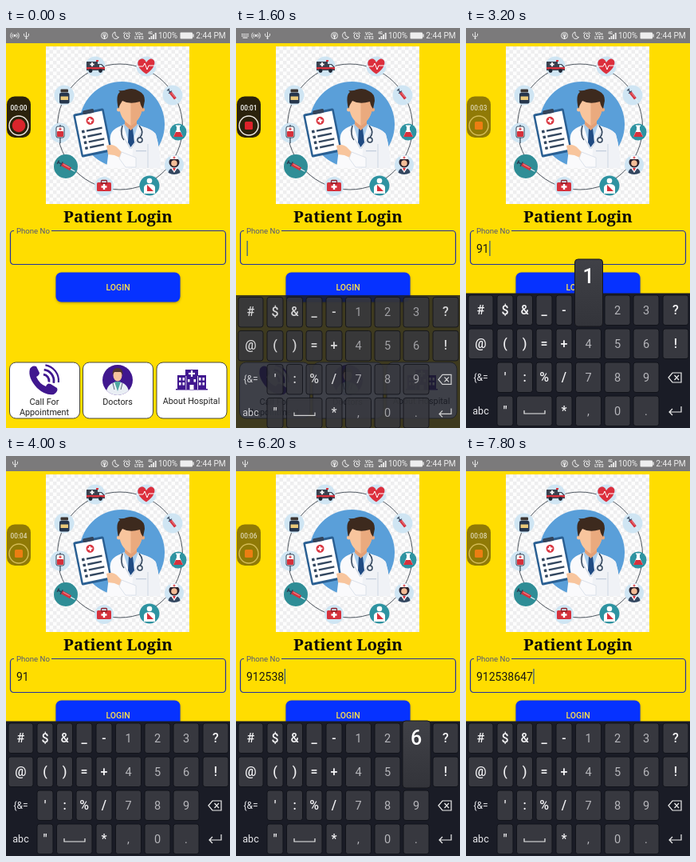
An HTML page with a canvas for the animation above (8 s loop, 281x500 px).

```html
<!DOCTYPE html>
<html lang="en">
<head>
<meta charset="utf-8">
<title>Patient Login</title>
<style>
html, body { margin: 0; width: 100%; height: 100%; overflow: hidden; background: #fd0; }
canvas { display: block; width: 281px; height: 500px; }
</style>
</head>
<body>
<canvas id="stage"></canvas>
<script>
const LOOP = 8000, TAU = Math.PI * 2;
const canvas = document.getElementById('stage');
const dpr = window.devicePixelRatio || 1;
canvas.width = 281 * dpr;
canvas.height = 500 * dpr;
const c = canvas.getContext('2d');

// Each key press: key, time down, time the digit lands, time up
const PRESSES = [
  ['9', 2400, 2500, 2800], ['1', 3000, 3100, 3400], ['2', 5150, 5300, 5400],
  ['5', 5400, 5500, 5600], ['3', 5600, 5700, 5800], ['8', 5850, 5950, 6050],
  ['6', 6150, 6300, 6400], ['4', 6400, 6500, 6600], ['7', 6700, 6800, 7000]
];
const TICKS = [800, 1800, 2800, 3800, 4600, 5600, 6600, 7400];

const clamp = v => Math.max(0, Math.min(1, v));

function dot(x, y, r, fill) {
  c.beginPath(); c.arc(x, y, r, 0, TAU);
  c.fillStyle = fill; c.fill();
}
function ring(x, y, r, stroke, w = 1, a = 0, b = TAU) {
  c.beginPath(); c.arc(x, y, r, a, b);
  c.strokeStyle = stroke; c.lineWidth = w; c.stroke();
}
function oval(x, y, rx, ry, fill) {
  c.beginPath(); c.ellipse(x, y, rx, ry, 0, 0, TAU);
  c.fillStyle = fill; c.fill();
}
function box(x, y, w, h, r, fill, stroke, lw = 1) {
  c.beginPath(); c.roundRect(x, y, w, h, r);
  if (fill) { c.fillStyle = fill; c.fill(); }
  if (stroke) { c.strokeStyle = stroke; c.lineWidth = lw; c.stroke(); }
}
function shape(d, fill, stroke, w = 1) {
  const p = new Path2D(d);
  if (fill) { c.fillStyle = fill; c.fill(p); }
  if (stroke) { c.strokeStyle = stroke; c.lineWidth = w; c.stroke(p); }
}
function text(s, x, y, size, fill, align = 'center', weight = 400, family = 'Roboto, "Liberation Sans", sans-serif') {
  c.font = `${weight} ${size}px ${family}`;
  c.textAlign = align;
  c.fillStyle = fill;
  c.fillText(s, x, y);
}
function at(x, y, angle, draw) {
  c.save(); c.translate(x, y); c.rotate(angle); draw(); c.restore();
}
function cross(x, y, r, fill, w = r * 0.7) {
  c.fillStyle = fill;
  c.fillRect(x - r, y - w / 2, r * 2, w);
  c.fillRect(x - w / 2, y - r, w, r * 2);
}

// Status bar
function usb(x) {
  shape(`M${x} 5V13M${x - 3} 7V9Q${x - 3} 11 ${x} 11Q${x + 3} 11 ${x + 3} 9V7`, null, '#eee', 0.9);
  dot(x, 13, 1, '#eee');
}
function signal(x) {
  dot(x, 9.5, 1.4, '#eee');
  for (const r of [3, 5.2]) {
    ring(x, 9.5, r, '#eee', 1, -0.8, 0.8);
    ring(x, 9.5, r, '#eee', 1, Math.PI - 0.8, Math.PI + 0.8);
  }
}
function statusBar(t) {
  c.fillStyle = '#7b7a7b';
  c.fillRect(0, 0, 281, 19);
  if (t < 1400) { signal(11); usb(25.5); }
  else if (t < 2200) {
    for (let i = 0; i < 4; i++) {
      c.fillStyle = '#eee';
      c.fillRect(7 + i * 2.4, 7, 1.5, 1.4);
      c.fillRect(7 + i * 2.4, 9.3, 1.5, 1.4);
    }
    c.fillRect(8.5, 11.6, 6, 1.2);
    signal(25); usb(39.5);
  } else usb(11.5);
  const w = '#eee';
  ring(123.5, 9.5, 4, w);
  ring(123.5, 9, 1.7, w);
  c.fillStyle = w;
  c.fillRect(122.8, 9, 1.5, 5);
  shape('M137 5A4.3 4.3 0 1 0 141.5 11.5Q136 11 137 5Z', null, w);
  ring(151.5, 10, 3.5, w);
  shape('M151.5 8V10.5H153.5M147 7L149.5 5M156 7L153.5 5', null, w);
  text('VO+', 167, 9, 5.2, w, 'center', 700);
  text('LTE2', 167, 14, 5.2, w, 'center', 700);
  text('4G', 181, 8, 4.5, w, 'center', 700);
  for (let i = 0; i < 4; i++) c.fillRect(179 + i * 2.6, 12 - i * 2, 1.8, 2 + i * 2);
  text('100%', 203, 13.2, 10, w);
  box(218.5, 5.5, 15.5, 8, 1, w);
  c.fillRect(234.3, 7.5, 1.4, 4);
  text('2:44 PM', 257, 13.2, 10.2, w);
}

// Illustration
function syringe(x, y, s, angle) {
  at(x, y, angle, () => {
    c.scale(s, s);
    shape('M-11 0H-5M-11 -2.5V2.5M-6 -3.2V3.2', null, '#2d3f57', 1.5);
    shape('M7 0H13', null, '#e4edf1', 1.2);
    box(-5.5, -2.2, 12.5, 4.4, 0.5, '#d6323e');
    shape('M-4 -0.8H5', null, '#f0a0a4', 0.9);
  });
}
function badges() {
  const pale = '#cfe5f3', red = '#d6313c', navy = '#24364f', teal = '#2e93a1';
  [[112, 48], [176, 48], [209, 84], [211, 171], [123, 198], [68, 131], [73, 84]]
    .forEach(([x, y], i) => dot(x, y, i === 4 || i === 3 ? 12 : 12.5, pale));
  dot(216, 130, 10.5, teal);
  dot(180, 197, 12.5, teal);
  dot(75, 173, 15, '#2f8d96');

  shape('M101 42H115V53H101ZM115 45H120L124 49V53H115Z', '#3a414e');
  c.fillStyle = red;
  c.fillRect(101, 49, 23, 2.5);
  c.fillRect(113, 40, 3, 2);
  cross(108, 45.5, 2.6, '#fff');
  shape('M117 46H119.5L122 49H117Z', '#cfe5f3');
  dot(106, 53.5, 2.4, '#1d2836'); dot(118.5, 53.5, 2.4, '#1d2836');

  shape('M176 57.5C160 47 165 37.5 172 38.5Q175 39.5 176 43Q178 39.5 181 38.5C188 38 190 48 176 57.5Z', '#dc2f3d');
  shape('M164 48H172L174 44L177 52L179 47H188', null, '#fff', 1);

  syringe(209, 84, 0.8, 0.9);
  syringe(75, 173, 1, 0.5);

  shape('M214 122H218V127L222 136H210L214 127Z', '#fff');
  shape('M213 130H219L222 136H210Z', red);
  c.fillStyle = '#fff'; c.fillRect(213, 121.5, 6, 1.5);

  oval(211, 168, 6.5, 6.5, '#2b2029');
  dot(211, 169, 3.8, '#f4bd98');
  shape('M206 164L207 160H215L216 164Z', '#fff');
  cross(211, 162, 1.5, red);
  shape('M203.5 181Q204 175 211 175Q218 175 218.5 181Q211 185 203.5 181Z', '#34465f');
  shape('M207 175H215L211 181Z', '#fff');
  shape('M209 175H213L211 179Z', red);

  box(114, 193, 18, 11, 1.5, red);
  box(119.5, 190.5, 7, 4, 1, null, '#8f222b', 1.3);
  cross(123, 198.5, 3.5, '#fff');

  dot(180, 191, 3.3, '#fff');
  shape('M173 207V199Q174 195 180 195Q186 195 187 199V207Z', '#fff');
  shape('M177 196L185 204H177Z', red);

  box(67, 81, 12.5, 13.5, 2, '#26364c');
  box(68.5, 76.5, 9.5, 4, 1, '#3c3532');
  c.fillStyle = '#e9c878'; c.fillRect(68.5, 85.5, 9.5, 4.5);

  box(63, 123, 10, 14, 2, '#fff', '#2c4156', 1);
  box(64, 129, 8, 7, 1, red);
  shape('M68 121V123M68 137V144', null, '#2c4156', 1.2);
  cross(68, 126.3, 1.7, red);
}
function doctor() {
  dot(145.5, 120.5, 53.5, '#5a9fd9');
  c.save();
  c.beginPath(); c.rect(80, 60, 130, 115); c.clip();
  shape('M126 176L131 135Q132 126 148 121H164Q184 126 188 133Q193 150 194 176Z', '#fafafc');
  shape('M162 122H164Q184 126 188 133Q193 150 194 176H157Z', '#f0f2f6');
  shape('M147 120L156 150L166 120Z', '#a9cdec');
  shape('M154 126H159L161 143L156.5 149L153 143Z', '#1f4a82');
  shape('M149 112H164V121L156.5 128L149 121Z', '#e3a077');
  c.restore();
  shape('M142 94Q142 82 156 82Q171 82 171 94Q172 113 156.5 122Q141 113 142 94Z', '#f8c59d');
  shape('M156.5 82Q171 82 171 94Q172 113 156.5 122Z', '#eaaa7e');
  dot(141.5, 102, 2.5, '#f8c59d'); dot(171.5, 102, 2.5, '#eaaa7e');
  shape('M141 101Q137 84 143 80L141 78Q147 79 151 77Q160 74 167 79Q174 82 174 91L172 101Q169 98 168 92Q155 96 146 91Q143 95 141 101Z', '#3d2a1e');
  shape('M147 121L143 128L156 151M166 121L171 128L157 151', null, '#c3cedd', 1);
  shape('M146 122Q143 135 148 140M167 122Q174 130 168 137', null, '#31445b', 1.5);
  ring(168, 140, 3, '#31445b', 1.5);
  shape('M178 145V175', null, '#ccd5e2', 1);
  box(163, 153, 13, 1.3, 0, '#c3cedd');

  at(108.5, 130.5, -0.2, () => {
    box(-19.5, -27, 39, 55, 2, '#2a5f92');
    box(-17, -24, 34, 49, 0, '#fff');
    box(-7, -29, 14, 5, 1.5, '#34445a');
    dot(0, -15, 5, '#d9353f');
    cross(0, -15, 3, '#fff');
    for (let i = 0; i < 4; i++) {
      box(-13, -5 + i * 7, 3.5, 3.5, 0.5, '#33475f');
      box(-7, -4.5 + i * 7, i % 2 ? 18 : 20, 2.4, 0, '#33475f');
    }
  });
  shape('M126 147Q135 144 141 151L147 157L145 163L136 159L128 158Z', '#f8c59d');
  shape('M145 155L163 162V174H150L142 163Z', '#fafafc', '#d3dbe6', 0.8);
}
function illustration() {
  c.fillStyle = '#fdfdfd';
  c.fillRect(50, 23, 180, 197);
  c.save();
  c.beginPath(); c.rect(50, 23, 180, 197); c.clip();
  c.fillStyle = '#eeeeef';
  const s = 4.5;
  for (let j = 0; j < 44; j++)
    for (let i = j % 2; i < 40; i += 2) c.fillRect(50 + i * s, 23 + j * s, s, s);
  c.restore();
  ring(143, 123.5, 78.5, '#3a434d', 0.9);
  badges();
  doctor();
}

// Cards at the bottom
function cards() {
  const ink = '#40178f';
  for (const x of [4, 96, 188.5]) box(x + 0.5, 418, 88, 70, 8, '#fff', '#343434', 0.9);
  shape('M30 426Q33 421 38 423L42 431Q42 434 38 436Q42 445 50 448Q52 443 56 445L64 450Q66 454 60 458Q50 460 39 450Q27 437 30 426Z', ink);
  ring(46, 441, 8, ink, 2.8, -1.45, 0.2);
  ring(46, 441, 14, ink, 2.8, -1.45, 0.2);
  ring(46, 441, 20, ink, 2.2, -1.4, 0.1);
  text('Call For', 48, 471, 11, '#222');
  text('Appointment', 48, 484, 10.8, '#222');

  dot(140, 440, 19, ink);
  c.save();
  c.beginPath(); c.arc(140, 440, 19, 0, TAU); c.clip();
  shape('M125 460Q126 445 136 443H144Q154 445 155 460Z', '#e9eef4');
  shape('M136 442H144L140 454Z', '#4fa7a1');
  shape('M134 444L136 452M146 444L144 452', null, '#55657b', 1);
  c.restore();
  oval(140, 434, 5.5, 7.5, '#f5c29d');
  shape('M133.5 434Q133 425 140 425Q147 425 146.5 434L144 430H136Z', '#51352e');
  text('Doctors', 140, 471, 10.8, '#222');

  c.fillStyle = ink;
  c.fillRect(215, 434, 11, 18);
  c.fillRect(240, 434, 11, 18);
  c.fillRect(225, 427, 16, 25);
  c.fillRect(213, 451, 40, 1.5);
  cross(233, 432, 4, '#fff', 2.2);
  c.fillStyle = '#fff';
  for (const y of [437, 443])
    for (const x of [217, 221.5, 242, 246.5]) c.fillRect(x, y, 2.5, 3.5);
  c.fillRect(228, 439, 2.5, 3.5);
  c.fillRect(235.5, 439, 2.5, 3.5);
  c.fillRect(230.5, 446, 5, 6);
  c.fillRect(225.5, 435, 0.8, 17);
  c.fillRect(240, 435, 0.8, 17);
  text('About Hospital', 232.5, 470, 10.8, '#222');
}

// Form
function form(t) {
  text('Patient Login', 140.5, 242.5, 20.3, '#0c0b08', 'center', 700, '"Noto Serif", "Liberation Serif", serif');

  box(5.5, 253.5, 270, 42, 4, null, '#2331a0', 1.2);
  c.fillStyle = '#fd0';
  c.fillRect(10, 251, 47, 5);
  text('Phone No', 13, 256.7, 9.6, '#51567a', 'left');

  const done = PRESSES.filter(p => t >= p[2]);
  const value = done.map(p => p[0]).join('');
  text(value, 13, 280.5, 14, '#1b1a12', 'left');
  if (t >= 1200) {
    let since = done.length ? done[done.length - 1][2] : 1200;
    if (t >= 4500) since = Math.max(since, 4500);
    if (Math.floor((t - since) / 500) % 2 === 0) {
      c.fillStyle = '#3a5f85';
      c.fillRect(13.5 + c.measureText(value).width, 266, 1.3, 19);
    }
  }

  c.save();
  c.shadowColor = 'rgba(80,60,0,.5)';
  c.shadowBlur = 3 * dpr;
  c.shadowOffsetY = dpr;
  box(62.5, 305.5, 156, 37, 7, '#0632ff');
  c.restore();
  text('LOGIN', 140.5, 328, 10.5, '#ffe14a', 'center', 500);
}

// Keyboard
const COLS = [[3, 31], [39, 20], [63.5, 20], [88, 20], [113, 20], [137.5, 32], [174, 32], [210, 32], [247, 32]];
const ROWS = ['#$&_-123?', '@()=+456!', ' \':%/789 ', ' "  *,0. '];
const rowY = r => 334 + r * 42;

function keyFace(x, y, w, h = 37.5) {
  box(x, y, w, h, 3, '#37383f', '#11131a', 1);
}
function keyboard() {
  c.fillStyle = '#1a1c26';
  c.fillRect(0, 331.5, 281, 172);
  ROWS.forEach((row, r) => [...row].forEach((ch, i) => {
    if (ch === ' ') return;
    const [x, w] = COLS[i], pad = i > 4 && i < 8;
    keyFace(x, rowY(r), w);
    text(ch, x + w / 2, rowY(r) + 23.8, pad ? 14.5 : 16, pad ? '#b5b5ba' : '#f4f4f6', 'center', pad ? 400 : 500);
  }));
  keyFace(63.5, rowY(3), 44.5);
  shape('M73 478V482H99V478', null, '#eee', 1.2);
  text('{&=', 18.5, 440.5, 12, '#e8e8ec');
  text('abc', 18.5, 482.5, 12.5, '#e8e8ec');
  shape('M254 437L259 431H270V443H259ZM261.5 434L267 440M267 434L261.5 440', null, '#eee', 1.2);
  shape('M270 473V480H255M259 476L255 480L259 484', null, '#eee', 1.2);
}
function popup(ch) {
  const r = ROWS.findIndex(s => s.includes(ch));
  const [x, w] = COLS[ROWS[r].indexOf(ch)], y = rowY(r) - 45;
  const g = c.createLinearGradient(0, y, 0, y + 84);
  g.addColorStop(0, '#404147');
  g.addColorStop(1, '#33343a');
  box(x - 1, y, w + 3, 84, 4, g, '#15161c', 1);
  text(ch, x + w / 2, y + 29.5, 25, '#fff', 'center', 500);
}

// Floating recorder button, see-through when idle
function recorder(t) {
  const idle = clamp((t - 2700) / 400);
  const mix = (a, b) => a + (b - a) * idle;
  c.save();
  c.globalAlpha = mix(1, 0.52);
  box(1, 85.5, 30, 51.5, 10, '#2b220c');
  c.globalAlpha = mix(1, 0.7);
  const n = TICKS.filter(s => t >= s).length;
  text('00:0' + n, 16, 103, 8.2, '#fff', 'center', 500);
  ring(16, 122, 12, `rgb(241,${mix(236, 215)},${mix(228, 120)})`, 1.4);
  c.globalAlpha = 1;
  if (t < 200) dot(16, 122, 8.3, '#d9252c');
  else box(11, 117, 10, 10, 1.5, `rgb(${mix(220, 236)},${mix(34, 126)},${mix(43, 18)})`);
  c.restore();
}

function draw(t) {
  c.setTransform(dpr, 0, 0, dpr, 0, 0);
  c.fillStyle = '#fd0';
  c.fillRect(0, 0, 281, 500);
  statusBar(t);
  illustration();
  cards();
  form(t);
  const shown = clamp((t - 1400) / 240);
  if (shown > 0) {
    c.save();
    c.globalAlpha = shown;
    c.translate(0, (1 - shown) * 15);
    keyboard();
    c.restore();
  }
  const held = PRESSES.find(p => t >= p[1] && t < p[3]);
  if (held) popup(held[0]);
  recorder(t);
}

const start = performance.now();
function frame(now) {
  draw(Math.max(0, now - start) % LOOP);
  requestAnimationFrame(frame);
}
draw(0);
requestAnimationFrame(frame);
</script>
</body>
</html>
```
